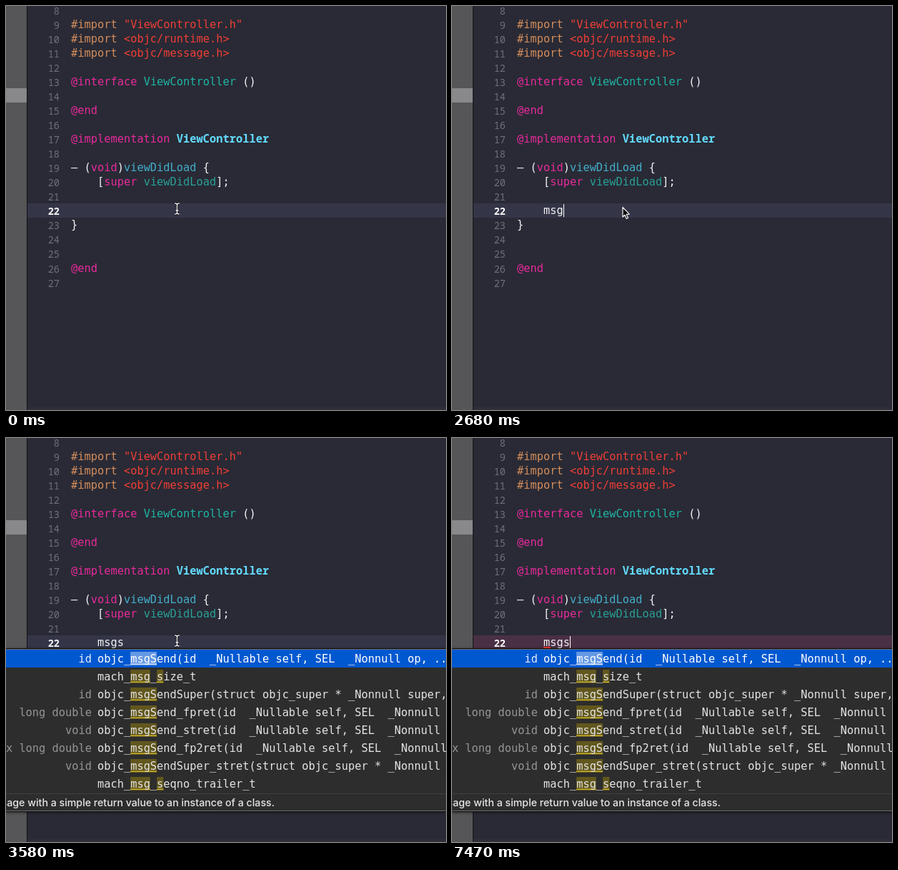
An HTML page with a canvas for the animation above (7.81 s loop, 616 by 565 pixels).

```html
<!DOCTYPE html>
<html lang="en">
<head>
<meta charset="utf-8">
<title>Code completion</title>
<style>
html, body { margin: 0; width: 100%; height: 100%; overflow: hidden; background: #292a35; }
canvas { display: block; width: 616px; height: 565px; }
</style>
</head>
<body>
<canvas id="stage"></canvas>
<script>
const W = 616, H = 565, LOOP = 7810;
const canvas = document.getElementById('stage');
const ctx = canvas.getContext('2d');
const ratio = window.devicePixelRatio || 1;
canvas.width = W * ratio;
canvas.height = H * ratio;

const NARROW = '"Noto Sans Mono", "DejaVu Sans Mono", monospace';
const CJK = '"Noto Sans CJK SC", "Noto Sans CJK", "Noto Sans", sans-serif';
const CODE = '15.35px "DejaVu Sans Mono", "Noto Sans Mono", monospace';
const BOLD = '700 15.4px ' + NARROW;
const DOC = '500 14.2px Inter, "Open Sans", sans-serif';
const PITCH = 9.24, LEFT = 91, WORD = LEFT + 4 * PITCH;

const C = {
  bg: '#292a35', row: '#343648', bad: '#4a3044', text: '#f2f2f4', num: '#6f7079',
  key: '#e82a9c', str: '#ef3e37', pre: '#d48d5b', type: '#1fb5a4',
  cls: '#63dcff', fn: '#44aecb', call: '#28a196', lit: '#9086c4'
};

// Line number -> [text, colour, bold] runs
const source = {
  9: [['#import ', C.pre], ['"ViewController.h"', C.str]],
  10: [['#import ', C.pre], ['<objc/runtime.h>', C.str]],
  11: [['#import ', C.pre], ['<objc/message.h>', C.str]],
  13: [['@interface ', C.key], ['ViewController', C.type], [' ()', C.text]],
  15: [['@end', C.key]],
  17: [['@implementation ', C.key], ['ViewController', C.cls, true]],
  19: [['– (', C.text], ['void', C.key], [')', C.text], ['viewDidLoad', C.fn], [' {', C.text]],
  20: [['    [', C.text], ['super', C.key], [' ', C.text], ['viewDidLoad', C.call], ['];', C.text]],
  23: [['}', C.text]],
  26: [['@end', C.key]]
};

const words = {
  one: ['吗', '没', '妈', '们', '美'],
  two: ['没事', '描述', '面试', '貌似', 'Ms'],
  three: ['没事干', '面试官', '美食馆', '马上给', '买水果']
};

// Return type, signature; brackets mark the matched letters
const lists = {
  short: [
    ['id', 'objc_[msg]Send(id  _Nullable self, SEL  _Nonnull op, ...)'],
    ['int', '[msg]ctl(int, int, struct msqid_ds *)'],
    ['int', '[msg]get(key_t, int)'],
    ['', '[msg]len_t'],
    ['', '[msg]qnum_t'],
    ['int', '[msg]snd(int, const void *, size_t, int)'],
    ['', 'mach_[msg]_size_t'],
    ['', 'mach_[msg]_header_t']
  ],
  full: [
    ['id', 'objc_[msgS]end(id  _Nullable self, SEL  _Nonnull op, ...)'],
    ['', 'mach_[msg]_[s]ize_t'],
    ['id', 'objc_[msgS]endSuper(struct objc_super * _Nonnull super, SEL'],
    ['long double', 'objc_[msgS]end_fpret(id  _Nullable self, SEL  _Nonnull op'],
    ['void', 'objc_[msgS]end_stret(id  _Nullable self, SEL  _Nonnull op'],
    ['complex long double', 'objc_[msgS]end_fp2ret(id  _Nullable self, SEL  _Nonnull op'],
    ['void', 'objc_[msgS]endSuper_stret(struct objc_super * _Nonnull super'],
    ['', 'mach_[msg]_[s]eqno_trailer_t']
  ]
};

const steps = [
  [0, { text: '', caret: false, words: '', list: '', doc: false, error: false, mouse: 'beam', mx: 239.5, my: 283.5 }],
  [450, { caret: true }],
  [1050, { caret: false }],
  [1350, { text: 'm', caret: true, words: 'one' }],
  [1640, { text: "m's", words: 'two' }],
  [1940, { text: "m's'g", words: 'three' }],
  [2390, { caret: false }],
  [2530, { text: 'msg', caret: true, words: '' }],
  [2680, { mouse: 'arrow' }],
  [2830, { list: 'short' }],
  [2980, { text: 'msgs', list: 'full', mouse: 'beam' }],
  [3130, { doc: true, mouse: 'arrow' }],
  [3430, { mouse: 'beam' }],
  [3580, { caret: false }],
  [4170, { caret: true }],
  [4770, { caret: false }],
  [5220, { caret: true }],
  [5370, { error: true }],
  [5820, { caret: false }],
  [6420, { caret: true }],
  [6870, { caret: false, mx: 279.5, my: 397.5 }],
  [7020, { mouse: '' }],
  [7470, { caret: true }]
];

function stateAt(t) {
  const state = {};
  for (const [at, change] of steps) if (t >= at) Object.assign(state, change);
  return state;
}

function box(x, y, w, h, color) {
  ctx.fillStyle = color;
  ctx.fillRect(x, y, w, h);
}

function label(str, x, y, color, font = CODE, align = 'left') {
  ctx.font = font;
  ctx.textAlign = align;
  ctx.fillStyle = color;
  ctx.fillText(str, x, y);
}

function path(points, close) {
  ctx.beginPath();
  points.forEach(([x, y]) => ctx.lineTo(x, y));
  if (close) ctx.closePath();
}

const lineY = n => Math.round(26 + (n - 9) * 20.03);

function drawEditor(s) {
  box(0, 0, W, H, C.bg);
  box(30, 276, W - 30, 20, s.error ? C.bad : C.row);
  box(30, 561, W - 30, 4, '#302e39');
  box(0, 0, 29, H, '#565658');
  box(0, 115, 29, 20, '#89898b');
  box(29, 0, 1, H, '#111216');
  for (let n = 8; n <= 27; n++) {
    const y = lineY(n), active = n === 22;
    label(n, 75, y + 6, active ? '#fff' : C.num, (active ? 700 : 500) + ' 13.6px ' + NARROW, 'right');
    let x = LEFT;
    for (const [str, color, bold] of source[n] || []) {
      label(str, x, y + 5, color, bold ? BOLD : CODE);
      x += str.length * PITCH;
    }
  }
}

function drawTyped(s) {
  [...s.text].forEach((ch, i) => {
    const x = WORD + i * PITCH;
    const color = s.words && i > 0 && i < 4 ? C.lit : C.text;
    label(ch, x, 291, color);
    if (s.words) box(x, 293, PITCH, 1.5, color);
  });
  if (s.error) box(128, 292, 10, 2, '#f0352f');
  if (s.caret) box(Math.round(WORD + s.text.length * PITCH), 277, 1, 18, '#fff');
}

function drawWords(items) {
  const font = '16px ' + CJK;
  ctx.font = font;
  const parts = items.map((word, i) => (i + 1) + '.' + word);
  const widths = parts.map(p => ctx.measureText(p).width);
  const end = 123 + widths.reduce((a, b) => a + b, 0) + 40;
  box(102, 302, Math.round(end) - 102, 37, '#fff');
  for (let y = 307; y < 339; y += 7.6) {
    ctx.beginPath();
    ctx.arc(103, y, 2.1, 0, 7);
    ctx.fillStyle = '#15151b';
    ctx.fill();
  }
  box(109, 302, 1, 37, '#f7e6e4');
  box(113, 302, 1, 37, '#f7e6e4');
  let x = 123;
  parts.forEach((p, i) => {
    label(p, x, 327, i ? '#4c4c4c' : '#f47b14', font);
    x += widths[i] + 10;
  });
  x += 9;
  ctx.strokeStyle = '#f47b14';
  ctx.lineWidth = 1.5;
  for (const [y, d] of [[317.5, -4], [322.5, 4]]) {
    path([[x - 4.5, y], [x, y + d], [x + 4.5, y]]);
    ctx.stroke();
  }
}

function drawSignature(str, y, selected) {
  let x = WORD;
  str.split(/[\[\]]/).forEach((part, i) => {
    const w = part.length * PITCH;
    if (i % 2) {
      box(x, y - 10, w, 19, selected ? '#6699e3' : '#62571d');
      box(x, y + 6.5, w, 1.5, selected ? '#c9dcfa' : '#c8b02c');
    }
    label(part, x, y + 5, selected ? '#fff' : '#e4e4e5');
    x += w;
  });
}

function drawList(s) {
  const x = s.list === 'short' ? 62 : 0;
  const w = W - x;
  const bottom = s.doc ? 522 : 496;
  ctx.save();
  ctx.shadowColor = 'rgba(0,0,0,.5)';
  ctx.shadowBlur = 4 * ratio;
  ctx.shadowOffsetY = ratio;
  box(x, 294, w, bottom - 293, '#0c0c0e');
  ctx.restore();
  box(x, 295, w, bottom - 295, '#6e6e70');
  box(x, 296, w, bottom - 297, '#2d2d2d');
  box(x, 296, w, 25, '#0058d0');
  lists[s.list].forEach(([type, signature], i) => {
    const y = 309 + i * 25;
    label(type, 120, y + 5, i ? '#959596' : '#e4edfa', CODE, 'right');
    drawSignature(signature, y, i === 0);
  });
  if (s.doc) {
    box(0, 497, W, 1, '#404040');
    label('Sends a message with a simple return value to an instance of a class.',
      376, 515, '#e6e6e6', DOC, 'right');
  }
}

function drawMouse(s) {
  ctx.save();
  ctx.translate(s.mx, s.my);
  ctx.lineJoin = 'round';
  if (s.mouse === 'beam') {
    for (const [color, width] of [['#0b0b0e', 3], ['#f4f4f4', 1.4]]) {
      ctx.strokeStyle = color;
      ctx.lineWidth = width;
      ctx.beginPath();
      for (const d of [-1, 1]) {
        ctx.moveTo(-3.2, 7.5 * d);
        ctx.quadraticCurveTo(0, 7.5 * d, 0, 5.5 * d);
        ctx.quadraticCurveTo(0, 7.5 * d, 3.2, 7.5 * d);
      }
      ctx.moveTo(0, -6);
      ctx.lineTo(0, 6);
      ctx.moveTo(-1.8, 2.5);
      ctx.lineTo(1.8, 2.5);
      ctx.stroke();
    }
  } else {
    path([[-.5, -2], [-.5, 11.5], [2.5, 8.7], [4.8, 14], [7, 13], [4.8, 7.9], [8.8, 7.7]], true);
    ctx.fillStyle = '#08080a';
    ctx.strokeStyle = '#f4f4f4';
    ctx.lineWidth = 1.2;
    ctx.fill();
    ctx.stroke();
  }
  ctx.restore();
}

function draw(t) {
  const s = stateAt(t);
  ctx.setTransform(ratio, 0, 0, ratio, 0, 0);
  drawEditor(s);
  drawTyped(s);
  if (s.words) drawWords(words[s.words]);
  if (s.list) drawList(s);
  if (s.mouse) drawMouse(s);
}

const start = performance.now();
function tick() {
  draw((performance.now() - start) % LOOP);
  requestAnimationFrame(tick);
}
tick();
</script>
</body>
</html>
```
